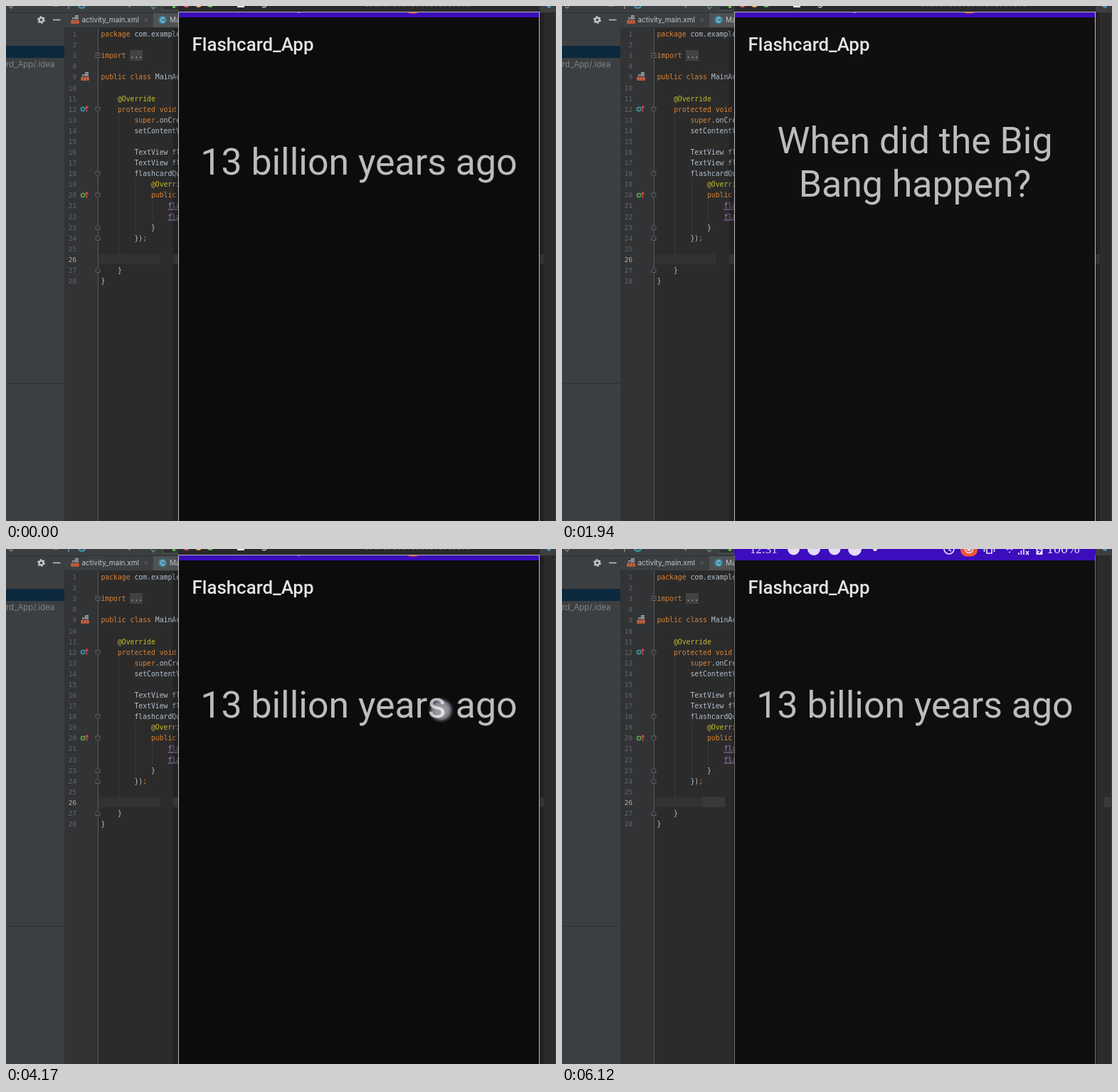
Write an HTML page that moves like this. It is 773 px wide and 724 px high and loops after 6220 ms.

```html
<!DOCTYPE html>
<html lang="en">
<head>
<meta charset="utf-8">
<title>Flashcard_App</title>
<style>
html, body { margin: 0; width: 100%; height: 100%; overflow: hidden; background: #2b2b2b; }
svg { display: block; width: 773px; height: 724px; }
text { white-space: pre; }
.code { font: 9.75px "DejaVu Sans Mono", monospace; fill: #b4c0cd; }
.num { font-size: 9.3px; fill: #65686b; text-anchor: end; }
.ui { font-family: Inter, "Open Sans", sans-serif; fill: #c3c5c7; }
.card { font: 51.8px Roboto, sans-serif; fill: #bcbcbc; text-anchor: middle; }
.clock { font-family: "Liberation Serif", serif; fill: #e4dcf8; }
.k { fill: #d88336; } .a { fill: #c4bd2c; } .f { fill: #a47db8; text-decoration: underline; }
.line { fill: none; stroke: #6c6f71; stroke-width: .8; }

.anim { animation: 6220ms step-end infinite; }
#answer { animation-name: answer; }
#question { animation-name: question; }
#touch { animation-name: touch; transform-origin: 611.5px 226.5px; }
#titlebar { animation-name: titlebar; }
#page { animation-name: page; }
#focused { animation-name: focused; }
#blurred { animation-name: blurred; }
#frame { animation-name: frame; }
@keyframes answer { 0%, 40.675% { opacity: 1 } 31.189% { opacity: 0 } 100% { opacity: 1 } }
@keyframes question { 0%, 40.675% { opacity: 0 } 31.189% { opacity: 1 } 100% { opacity: 0 } }
@keyframes touch {
  0%, 16.72%, 71.864%, 100% { opacity: 0; transform: none }
  12.057%, 67.041% { opacity: 1; transform: none }
  14.308%, 69.453% { opacity: .4; transform: scale(.85) }
}
@keyframes titlebar { 0% { opacity: 1 } 86.334% { opacity: .13 } 88.745%, 100% { opacity: 0 } }
@keyframes page {
  0%, 40.675% { fill: #0c0c0c } 31.189% { fill: #100f0e } 98.392%, 100% { fill: #0e0e0e }
}
@keyframes focused { 0% { opacity: 1 } 98.392%, 100% { opacity: 0 } }
@keyframes blurred { 0% { opacity: 0 } 98.392%, 100% { opacity: 1 } }
@keyframes frame { 0% { stroke: #bcbcbc } 98.392%, 100% { stroke: #707070 } }
</style>
</head>
<body>
<svg viewBox="0 0 773 724">
  <defs>
    <radialGradient id="glow">
      <stop offset="0" stop-color="#fff" stop-opacity=".62"/>
      <stop offset=".45" stop-color="#f4f2fa" stop-opacity=".6"/>
      <stop offset=".68" stop-color="#e2def0" stop-opacity=".5"/>
      <stop offset=".84" stop-color="#b9b2d0" stop-opacity=".2"/>
      <stop offset="1" stop-color="#9990b8" stop-opacity="0"/>
    </radialGradient>
    <clipPath id="left"><path d="M0 0H242V724H0z"/></clipPath>
    <g id="layout">
      <path d="M0-6H5V-.5H-4V-3H0z" fill="#929da4"/>
      <path d="M1-3.500H5M-3-1.500H0" stroke="#4a4f52" stroke-width=".8"/>
      <path d="M-6 .5H6V6H-6z" fill="#a34a30"/>
      <path d="M-2.500 1.200L-5 3.200-2.500 5.200M2.500 1.200L5 3.200 2.500 5.200M1 1L-1 5.500" fill="none" stroke="#e58a62"/>
    </g>
    <g id="override">
      <circle cx="-2.400" r="2.600" fill="none" stroke-width="1.800"/>
      <path d="M3 4V-4M.8-1.600L3-4.200 5.200-1.600" fill="none" stroke="#d4504c" stroke-width="1.200"/>
    </g>
    <path id="open" d="M-3-3H3V1L0 3.800-3 1z"/>
    <path id="close" d="M-3 3H3V-1L0-3.800-3-1z"/>
  </defs>

  <g clip-path="url(#left)">
    <path d="M0 0H242V724H0z" fill="#2b2b2b"/>
    <path d="M82 30H129V724H82z" fill="#313335"/>
    <path d="M0 0H82V724H0zM82 0H242V30H82z" fill="#3c3f41"/>
    <path d="M207 10H242V30H207z" fill="#4e5254"/>
    <path d="M0 9.500H242M82 30.500H242M0 530.500H82" stroke="#2e3032"/>
    <path d="M0 56H82V73H0z" fill="#0d293e"/>
    <path d="M129.500 31V724" stroke="#56585a"/>
    <path d="M158.500 153V363M182.500 243V318M205.500 273V303" stroke="#393939"/>

    <g fill="none" stroke-width="1.500">
      <path d="M4 0l3 3 3-3M66 0h7M172 0l3 2M88 0v4" stroke="#85898b"/>
      <path d="M102 0a5 5 0 0 0 9 0" stroke="#4291ad" stroke-width="2.500"/>
      <path d="M204 0l3 4 3-3" stroke="#57965c"/>
    </g>
    <path d="M220 0H242V6H220z" fill="#2d3032" stroke="#595c5e"/>
    <path d="M234 0h4v3h-4z" fill="#62b543"/>

    <circle cx="49.500" cy="19.500" r="3" fill="none" stroke="#c4c6c8" stroke-width="2.400"/>
    <circle cx="49.500" cy="19.500" r="4.700" fill="none" stroke="#c4c6c8" stroke-width="1.600" stroke-dasharray="2.400 2.520"/>
    <path d="M66 19.500H76.500" stroke="#c4c6c8" stroke-width="1.500"/>
    <use href="#layout" x="97" y="19"/>
    <text class="ui" x="106.500" y="23" font-size="10">activity_main.xml</text>
    <path d="M194.500 17l5 5M199.500 17l-5 5" class="line"/>
    <circle cx="220" cy="19.500" r="5.800" fill="#3d87a3"/>
    <text class="ui" x="220" y="23" font-size="9" text-anchor="middle" style="fill:#d5e5eb">C</text>
    <text class="ui" x="230" y="23" font-size="10">MainActivity.java</text>
    <text class="ui" x="68.500" y="86" font-size="11.500" text-anchor="end" style="fill:#828587">rd_App/.idea</text>

    <path d="M130 348.500H217V363H130z" fill="#323232"/>
    <path d="M174 62H192V77H174z" fill="#414343"/>
    <g id="code"></g>
    <use href="#layout" x="111" y="99"/>
    <use href="#override" x="110.500" y="145" stroke="#3c91ae"/>
    <use href="#override" x="110.500" y="266" stroke="#5a9c46"/>
    <g class="line" id="folds" style="fill:#2f3133"></g>
    <path class="line" d="M126 66.500h6v6h-6zM127.500 69.500h3" style="fill:#2f3133"/>
  </g>

  <path d="M750 0H773V724H750z" fill="#2b2b2b"/>
  <path d="M750 0H773V9H750z" fill="#3c3f41"/>
  <path d="M760 0l4 2 1-2" stroke="#4a9cc9" stroke-width="2" fill="none"/>
  <path d="M772.500 10V724" stroke="#3b3d3e"/>
  <g id="focused" class="anim">
    <path d="M235 31H242V724H235zM750 10H756V724H750z" fill="#000" opacity=".2"/>
    <path d="M235 349H242V363H235zM750 349H756V363H750z" fill="#333"/>
  </g>
  <g id="blurred" class="anim">
    <path d="M239 31H242V724H239zM750 10H752V724H750z" fill="#000" opacity=".15"/>
    <path d="M197 348.500H229V363H197zM762 348.500H773V363H762z" fill="#393939"/>
  </g>

  <path id="page" class="anim" d="M242 0H750V724H242z"/>
  <path d="M242 0H750V16H242z" fill="#3c0dbd"/>
  <g fill="#e4dcf8">
    <text class="clock" x="264" y="6" font-size="17">12:31</text>
    <text class="clock" x="681" y="6" font-size="20">100%</text>
    <circle cx="325.500" cy="0" r="8.500"/><circle cx="354" cy="0" r="9"/>
    <circle cx="383" cy="0" r="8.500"/><circle cx="411.500" cy="0" r="9.500"/>
    <circle cx="440" cy="0" r="3"/>
  </g>
  <rect x="560" y="-12" width="24" height="22.500" rx="9" fill="#ee5635"/>
  <g fill="none" stroke="#e4dcf8" stroke-width="1.700">
    <path d="M544-4V1l3 2"/>
    <circle cx="544" cy="0" r="7"/>
    <circle cx="572" cy="0" r="5.500"/><circle cx="572" cy="0" r="2" fill="#e4dcf8"/>
    <path d="M597-6V6h7V-6M593.500-3V4M607.500-3V4"/>
    <path d="M625 1q4-3 8 0M628 4.500h2"/>
    <path d="M642 8V5M645.500 8V2M649 8V-2M652 3l4 5M656 3l-4 5"/>
  </g>
  <path d="M666.500-5h9V8h-9z" fill="#e4dcf8"/>
  <path d="M672-3l-3 5h4l-3 4" fill="none" stroke="#3c0dbd" stroke-width="1.300"/>

  <g id="titlebar" class="anim">
    <path d="M242 0H750V8H242z" fill="#29292b"/>
    <path d="M242 8H750V9H242z" fill="#b0b0b2"/>
    <circle cx="253.500" cy="-3" r="5" fill="#f4605a"/>
    <circle cx="270.500" cy="-3" r="5" fill="#f5bd4f"/>
    <circle cx="287" cy="-3" r="5" fill="#62c454"/>
    <path d="M325 0h10v2h-10z" fill="#e8e8e8"/>
    <path d="M360 1q4 2 6-1" fill="none" stroke="#ddd" stroke-width="1.300"/>
    <path d="M505 .5H655" stroke="#5b5b5d" stroke-dasharray="4 3 2 4"/>
  </g>

  <path id="frame" class="anim" d="M242.500 9V724M749.500 9V724" fill="none"/>
  <text x="261.600" y="62.500" font-family="Roboto, sans-serif" font-weight="500" font-size="25.850" fill="#e4e4e4">Flashcard_App</text>
  <text id="answer" class="card anim" x="496" y="237.300">13 billion years ago</text>
  <g id="question" class="card anim">
    <text x="496" y="207">When did the Big</text>
    <text x="496" y="267.700">Bang happen?</text>
  </g>
  <circle id="touch" class="anim" cx="611.500" cy="226.500" r="18.500" fill="url(#glow)"/>
</svg>
<script>
const NS = "http://www.w3.org/2000/svg";
const rowY = row => 39.7 + row * 15.087;

function add(parent, tag, attrs, content = "") {
  const el = document.createElementNS(NS, tag);
  for (const key in attrs) el.setAttribute(key, attrs[key]);
  el.textContent = content;
  parent.append(el);
  return el;
}

// Line number, indent level, then class:text pieces
const lines = [
  [1, 0, "k:package ", ":com.example.flashcard_app", "k:;"], [2], [3, 0, "k:import ", ":..."], [8],
  [9, 0, "k:public class ", ":MainActivity"], [10],
  [11, 1, "a:@Override"],
  [12, 1, "k:protected void ", ":onCreate"],
  [13, 2, "k:super", ":.onCreate"],
  [14, 2, ":setContentView"], [15],
  [16, 2, ":TextView flashcardQuestion"],
  [17, 2, ":TextView flashcardAnswer"],
  [18, 2, ":flashcardQuestion"],
  [19, 3, "a:@Override"],
  [20, 3, "k:public void"],
  [21, 4, "f:flashcardQuestion"],
  [22, 4, "f:flashcardAnswer"],
  [23, 3, ":}"], [24, 2, ":})", "k:;"], [25], [26],
  [27, 1, ":}"], [28, 0, ":}"]
];

const code = document.getElementById("code");
lines.forEach(([num, indent = 0, ...parts], row) => {
  const y = rowY(row) + 3.4;
  const label = add(code, "text", { class: "code num", x: 99, y }, num);
  if (num === 26) label.style.fill = "#b4b4b4";
  const line = add(code, "text", { class: "code", x: 133.5 + indent * 23.5, y });
  for (const part of parts) {
    const cut = part.indexOf(":");
    add(line, "tspan", { class: part.slice(0, cut) }, part.slice(cut + 1));
  }
});

const folds = document.getElementById("folds");
for (const row of [7, 13, 15]) add(folds, "use", { href: "#open", x: 129, y: rowY(row) });
for (const row of [18, 19, 22]) add(folds, "use", { href: "#close", x: 129, y: rowY(row) });
</script>
</body>
</html>
```
